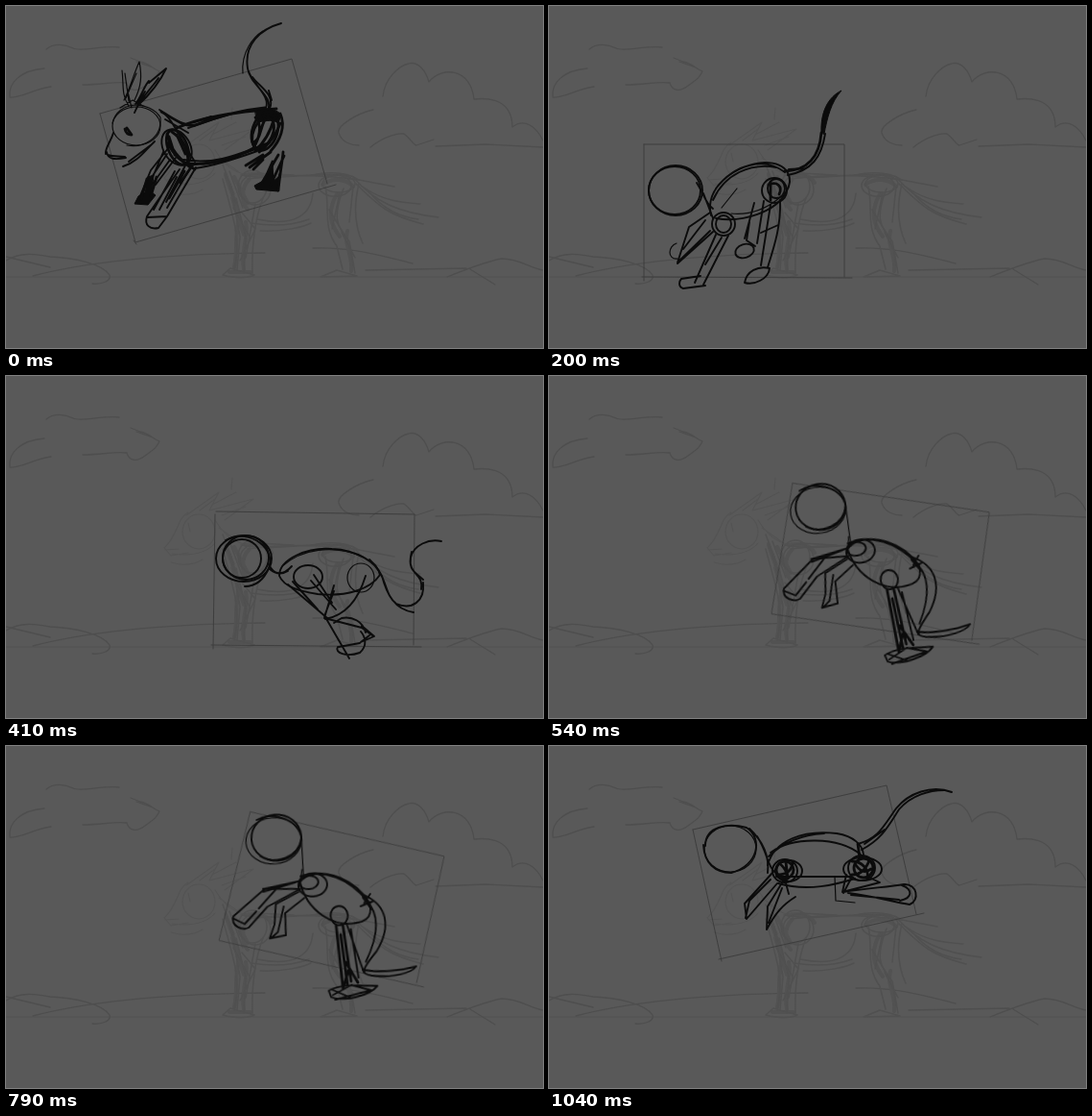
Animation, 560 px wide and 356 px high, one loop 1160 ms. Source, as an HTML page:

```html
<!DOCTYPE html>
<html lang="en">
<head>
<meta charset="utf-8">
<title>Jump cycle sketch</title>
<style>
html, body { margin: 0; width: 100%; height: 100%; overflow: hidden; background: #595959; }
svg { display: block; width: 560px; height: 356px; }
path, ellipse { fill: none; stroke-linecap: round; stroke-linejoin: round; }
.land { stroke: #4e4e4e; stroke-width: 1.3; }
.ghost { stroke: #505050; stroke-width: 1.5; }
.ghost .faint { stroke: #535353; stroke-width: 1.1; }
.ghost .shade { stroke: #525252; stroke-width: 4; }
.pose { stroke: #0b0b0b; stroke-width: 1.9; opacity: 0; animation: 1160ms step-end infinite; }
.pose .box { stroke: #3c3c3c; stroke-width: .9; }
.pose .thin { stroke-width: 1.2; }
.pose .bold { stroke-width: 2.8; }
.pose .ink { fill: #0b0b0b; stroke-width: 1; }

/* Each drawing is held, and shifted where it doubles as an in-between. */
#leap { animation-name: leap; }
#dive { animation-name: dive; }
#land { animation-name: land; transform-origin: 203px 213px; }
#tuck { animation-name: tuck; }
#push { animation-name: push; transform-origin: 372px 183px; }
#rise { animation-name: rise; }
#soar { animation-name: soar; }
@keyframes leap { 0% { opacity: 1 } 6.897%, 100% { opacity: 0 } }
@keyframes dive { 0% { opacity: 0 } 6.897% { opacity: 1 } 13.793%, 100% { opacity: 0 } }
@keyframes land {
  0% { opacity: 0 }
  13.793% { opacity: 1; transform: translate(-3px, -17px) rotate(-9deg) }
  17.241% { opacity: 1; transform: none }
  25% { opacity: 1; transform: translate(35px, 0) }
  31.897%, 100% { opacity: 0; transform: none }
}
@keyframes tuck {
  0% { opacity: 0 }
  31.897% { opacity: 1; transform: translate(-45px, 0) }
  35.345% { opacity: 1; transform: none }
  46.552%, 100% { opacity: 0; transform: none }
}
@keyframes push {
  0% { opacity: 0 }
  46.552% { opacity: 1; transform: translate(-25px, 11px) rotate(-9deg) }
  56.897% { opacity: 1; transform: none }
  68.103% { opacity: 1; transform: translate(-31px, -25px) rotate(-4.5deg) }
  78.448%, 100% { opacity: 0; transform: none }
}
@keyframes rise { 0% { opacity: 0 } 78.448% { opacity: 1 } 89.655%, 100% { opacity: 0 } }
@keyframes soar { 0% { opacity: 0 } 89.655%, 100% { opacity: 1 } }
</style>
</head>
<body>
<svg viewBox="0 0 560 356">
  <g class="land">
    <path d="M47 84C30 86 15 96 4 95C2 80 15 67 40 65M42 45C50 38 62 40 70 44S100 41 118 43"/>
    <path d="M80 82C100 82 115 78 126 80C128 88 136 90 145 83S156 76 160 68C154 66 150 60 140 58L130 54M136 58L153 64"/>
    <path d="M393 94C395 75 410 62 420 60C430 57 438 68 441 79C455 62 485 65 488 97C505 95 528 98 528 126C541 116 553 126 560 140"/>
    <path d="M383 108C365 112 345 125 347 132C350 142 360 145 368 145M380 147C395 135 410 132 415 133C422 138 425 145 428 145L446 139M448 146L500 144L560 147"/>
    <path d="M0 282H560" stroke-width=".8"/>
    <path d="M0 265C15 256 30 258 46 261C70 262 100 268 108 280C110 287 98 290 90 289M0 261L46 272M28 281C90 265 180 258 270 257"/>
    <path d="M320 252C360 250 400 262 424 268M375 275L480 273M460 282C490 270 505 265 517 263C535 263 545 272 560 275M484 274L510 290"/>
  </g>

  <g class="ghost">
    <g class="faint">
      <ellipse cx="201" cy="162" rx="17" ry="18"/>
      <path d="M190 142C178 148 180 165 165 179L172 187L190 184M166 181L180 180M172 194C185 198 195 197 205 191M173 185C195 188 210 183 218 174M190 153L192 162"/>
      <path d="M188 145L222 121L212 140L258 128L228 150M202 140L218 128M215 134L240 121M235 118L236 106M225 145L250 136"/>
      <path d="M218 150C228 166 238 174 250 175M222 158L242 172"/>
    </g>
    <g class="shade">
      <path d="M229 176C234 192 240 205 244 222M238 178L252 205M236 200L248 238M254 180C244 190 246 205 252 212"/>
      <path d="M243 222C238 238 242 256 238 272M250 225C254 240 244 256 248 274M233 277H255M330 186C340 178 355 180 362 188"/>
      <path d="M345 196C334 215 339 228 348 240M356 234C352 250 362 258 360 276M250 176C265 173 274 178 277 184"/>
    </g>
    <path d="M226 165L238 196M228 174L240 206M233 172L247 210M245 176C290 183 310 172 360 177M252 180C290 175 325 175 368 181M262 174L300 176M318 176C340 172 356 173 368 181"/>
    <ellipse cx="260" cy="191" rx="16" ry="16"/>
    <ellipse cx="257" cy="188" rx="15" ry="17"/>
    <ellipse cx="343" cy="187" rx="17" ry="11"/>
    <ellipse cx="347" cy="185" rx="17" ry="9"/>
    <path d="M262 222C300 230 318 218 320 195M265 234C290 235 310 230 318 226M256 226C280 230 300 228 316 222"/>
    <path d="M226 180C235 215 246 240 238 275M234 185L244 240L241 275M240 200L250 240L248 278M268 200C260 220 256 250 257 278M246 215L260 232L244 265M260 206L250 262M237 210L254 240M226 280L234 273L259 280C250 284 238 283 226 280"/>
    <path d="M333 188C338 210 330 230 345 250L351 274M352 190C340 220 345 230 358 245L364 278M368 185C362 210 364 230 372 247M328 282L345 275L366 281ZM337 212L354 240M362 188L358 225M348 195L340 232M350 236L364 262"/>
    <path d="M362 178C385 205 410 215 451 220M365 185C390 210 400 218 435 227M368 181L405 188M372 188C395 205 420 205 432 206M380 195C395 213 415 220 430 222"/>
  </g>

  <g class="pose" id="leap">
    <path class="box" d="M98 112L298 55L335 185M344 186L135 246L98 112M133 244L136 248"/>
    <ellipse class="thin" cx="136" cy="125" rx="25" ry="20"/>
    <path class="thin" d="M111 122C116 98 150 98 161 116C163 139 142 148 126 145"/>
    <path class="bold" d="M124 128C125 133 129 134 131 134L126 127"/>
    <path d="M112 132C109 142 103 148 104 154M105 152C106 160 114 160 125 158M106 155C112 157 117 156 124 157M122 167C138 162 145 150 155 141M128 162L152 144"/>
    <path class="thin" d="M128 104C120 92 123 82 121 67M124 70L128 99M123 98C130 84 132 74 139 58C142 73 141 84 134 98M125 96L136 70M119 106L132 98L143 104M126 85L131 106"/>
    <path d="M135 102C141 95 144 83 149 78M149 80L167 65C161 78 150 92 138 103M134 111C140 96 150 88 159 75M137 102L145 89"/>
    <path class="bold" d="M162 110C176 118 186 126 197 124C218 116 240 109 270 106M178 127C205 115 240 110 282 107"/>
    <path d="M160 108C174 116 182 140 197 162M166 118L190 132M190 127C220 117 245 106 275 108M196 121L214 115"/>
    <path class="bold" d="M188 164C210 166 235 161 258 148M192 165C220 164 245 156 270 144"/>
    <path d="M185 160C220 166 245 153 275 142M197 169C220 166 248 156 262 151"/>
    <ellipse class="bold" cx="179" cy="147" rx="10" ry="19" transform="rotate(-22 179 147)"/>
    <ellipse cx="178" cy="147" rx="14" ry="20" transform="rotate(-30 178 147)"/>
    <path class="bold" d="M168 133C172 150 180 158 192 168M173 131C186 140 190 150 190 164M169 143C176 158 184 162 197 170M178 134L187 154M170 136L176 155"/>
    <path class="ink" d="M260 110C270 105 282 107 287 113L284 122C276 116 268 122 262 120Z"/>
    <ellipse class="bold" cx="270" cy="130" rx="13" ry="21" transform="rotate(18 270 130)"/>
    <ellipse class="bold" cx="268" cy="132" rx="10" ry="17" transform="rotate(24 268 132)"/>
    <path class="bold" d="M286 112C292 125 286 140 276 151M260 116C268 124 264 138 258 148M280 116C276 130 270 142 260 150M270 118C264 130 266 138 258 142M286 122C280 138 270 148 264 152"/>
    <path d="M170 147L151 171L139 200M164 152L150 185M171 160L153 185M177 158L156 186M168 154L148 184"/>
    <path class="ink" d="M148 178L154 176L152 194L156 197L148 207L134 206L138 198L145 194Z"/>
    <path class="bold" d="M157 178L151 198M147 180L141 201"/>
    <path d="M181 170L160 200L147 219C144 228 150 233 159 231L168 219L198 168M178 178L160 212M187 166L167 204M190 172L168 210M147 220L168 219M176 172L154 212"/>
    <path class="bold" d="M186 172L170 200M195 165L182 184M250 166L268 155M254 168L276 152M258 170L268 160"/>
    <path class="ink" d="M278 166L268 182L259 187L261 191L284 193L287 168L284 178L279 182Z"/>
    <path class="bold" d="M289 152C288 164 285 178 284 192M284 155L267 184M290 156L276 186M278 162L270 180"/>
    <path d="M273 108C280 94 254 82 252 65C248 40 265 24 287 18M271 106C276 94 258 82 253 68M275 107C281 92 264 84 257 74M277 98L274 88"/>
    <path class="thin" d="M247 70C245 48 258 32 268 26"/>
  </g>

  <g class="pose" id="dive">
    <path class="box" d="M79 143L276 78L319 207M327 205L117 274M121 276L79 143"/>
    <ellipse cx="119" cy="163" rx="23" ry="21"/>
    <ellipse cx="120" cy="163" rx="22" ry="22"/>
    <path d="M142 151C148 156 154 158 160 158M142 153C152 166 150 170 163 181M145 154L158 171M156 160C162 150 172 144 182 137M158 157L171 145"/>
    <ellipse cx="207" cy="159" rx="48" ry="29" transform="rotate(-24 207 159)"/>
    <ellipse cx="206" cy="160" rx="46" ry="30" transform="rotate(-28 206 160)"/>
    <path class="bold" d="M160 164C178 142 210 125 246 126M160 176C158 160 190 136 232 128M176 192C200 193 220 182 240 166M162 161C161 174 164 184 176 190M184 146C205 132 226 125 250 130M190 192C212 188 226 176 236 167"/>
    <ellipse class="bold" cx="236" cy="149" rx="15" ry="21" transform="rotate(18 236 149)"/>
    <ellipse class="bold" cx="241" cy="148" rx="12" ry="19" transform="rotate(20 241 148)"/>
    <ellipse cx="234" cy="150" rx="11" ry="15"/>
    <path class="bold" d="M223 140C222 152 226 164 232 170M246 128C258 134 258 152 246 166M228 138C234 146 232 156 240 162M248 136C244 148 246 156 236 166M226 150C236 142 244 144 250 138"/>
    <ellipse cx="176" cy="184" rx="15" ry="12"/>
    <ellipse cx="172" cy="190" rx="14" ry="12"/>
    <ellipse cx="179" cy="187" rx="11" ry="13"/>
    <path class="bold" d="M162 180C170 172 184 174 190 180M162 186C168 196 180 198 188 190M164 176C162 186 166 192 174 194"/>
    <path class="thin" d="M152 206C162 210 176 208 184 204M156 182L146 190"/>
    <path d="M158 179L136 196M146 202L107 216M128 201L112 212M156 201L130 219L109 228M104 218C102 222 104 226 107 228M156 197L140 208"/>
    <path d="M160 208L122 255M152 220L134 238M114 262C112 266 116 270 120 269L130 267M114 262L125 257M171 200L146 244L136 265M160 208L148 234L159 232M168 208L140 250M154 222L140 248M164 206L150 228"/>
    <path d="M222 168C219 192 210 208 207 220L213 224L225 202M218 196L211 212M225 164C220 190 226 205 224 222M228 168C223 188 228 206 226 224M242 164L244 210M242 174L238 203M246 160L242 186M224 223C220 235 226 240 235 235C245 231 254 218 250 212M238 224L228 224"/>
    <path class="bold" d="M232 74C236 90 258 98 256 112M228 68C226 58 234 46 244 41"/>
    <path d="M245 123C261 103 232 96 226 76C224 61 235 43 253 38C240 48 232 57 232 73C236 90 260 99 254 127M242 117C255 106 249 98 238 92M250 112L247 126"/>
  </g>

  <g class="pose" id="land">
    <path class="box" d="M99 144H308V282M316 283L97 282M99 286V144"/>
    <ellipse cx="131" cy="192" rx="27" ry="25"/>
    <ellipse cx="132" cy="192" rx="28" ry="26"/>
    <path d="M154 184C163 198 162 204 171 211M161 195L171 221"/>
    <path d="M169 218C162 188 196 164 225 163C250 163 256 180 247 194C237 214 202 226 174 221M171 202C183 175 210 163 237 168M174 190C194 164 225 157 246 173"/>
    <path class="thin" d="M180 210L196 190M190 216C212 218 229 209 240 200"/>
    <ellipse cx="235" cy="192" rx="13" ry="13"/>
    <ellipse cx="237" cy="190" rx="9" ry="10"/>
    <path class="bold" d="M229 186C238 182 244 188 240 196M231 184L231 202"/>
    <ellipse cx="182" cy="227" rx="12" ry="12"/>
    <ellipse cx="182" cy="227" rx="8" ry="9"/>
    <path d="M168 215L146 230L134 267L168 234M163 223L140 253M171 235L134 268"/>
    <path class="thin" d="M133 247C124 250 123 264 134 263"/>
    <path d="M174 238L152 288M187 239L161 290M180 241L163 269M138 284L158 281M163 291L140 294C134 292 136 286 138 284"/>
    <path d="M214 205L204 242M224 203L217 247M209 225L206 244L215 250M241 202C242 229 235 250 228 272M231 207L221 270M221 236L239 228"/>
    <ellipse cx="204" cy="255" rx="10" ry="7" transform="rotate(-18 204 255)"/>
    <path d="M204 288C206 276 218 270 230 273C229 284 214 291 204 288"/>
    <path class="bold" d="M246 172C269 171 282 158 284 132"/>
    <path d="M249 176C274 171 284 158 288 133M250 170L268 169"/>
    <path class="ink" d="M284 132C283 110 291 95 305 88C294 100 290 117 287 133Z"/>
  </g>

  <g class="pose" id="tuck">
    <path class="box" d="M219 141L426 144L425 280M433 282L214 280M216 284L218 144"/>
    <ellipse cx="248" cy="190" rx="29" ry="24"/>
    <ellipse cx="250" cy="189" rx="24" ry="23"/>
    <ellipse cx="246" cy="190" rx="20" ry="20"/>
    <path d="M229 171C256 157 282 182 274 200C268 214 258 219 249 219"/>
    <path d="M274 196C279 207 288 209 298 198M275 201C282 207 289 206 294 203"/>
    <path d="M285 208C285 190 315 178 340 180C366 181 388 195 390 207C380 222 355 230 325 227C307 224 290 220 285 208"/>
    <path class="thin" d="M288 198C308 180 341 175 372 188"/>
    <ellipse cx="315" cy="209" rx="15" ry="12"/>
    <ellipse class="thin" cx="370" cy="210" rx="14" ry="15"/>
    <path d="M294 217L335 252M299 214L325 243M318 213L344 243M321 207L340 236M375 208C368 231 356 249 333 253M332 252L342 218M342 224L332 250"/>
    <path d="M333 251L358 294M336 253L371 262L382 270M342 257L350 252C361 250 372 255 375 267M371 260L384 271L370 277L379 270M346 282C342 288 355 293 369 288C377 281 375 272 370 266M347 282L369 278"/>
    <path d="M379 191C398 207 394 228 407 237C423 244 437 235 435 215M392 208C397 227 405 243 425 246M433 222C436 205 419 207 422 189C425 176 441 169 454 172M435 212C427 204 418 203 423 183"/>
  </g>

  <g class="pose" id="push">
    <path class="box" d="M293 87L491 149L452 278M459 283L250 218L293 87"/>
    <ellipse cx="318" cy="116" rx="26" ry="24"/>
    <ellipse class="thin" cx="315" cy="119" rx="29" ry="24"/>
    <path d="M299 96C317 87 344 100 344 119C339 139 315 144 300 134"/>
    <path class="thin" d="M344 119L343 161M342 151L339 166"/>
    <path d="M339 164C351 150 381 158 401 181C416 196 411 210 394 211C370 214 344 195 339 164M340 158C368 151 397 166 410 192"/>
    <ellipse cx="352" cy="168" rx="15" ry="12"/>
    <ellipse cx="348" cy="165" rx="10" ry="7"/>
    <ellipse cx="377" cy="202" rx="9" ry="10"/>
    <path d="M338 163L302 168L267 194C263 204 275 210 282 207L303 187L339 171M300 171L334 164M316 167L294 188M266 196L278 203L291 191M300 168L337 171"/>
    <path d="M337 174L312 185L309 206L303 220L320 218L321 195L342 181M320 188L312 214L304 220"/>
    <path class="bold" d="M373 212L375 277M380 212L384 271M377 222L380 275M380 251L391 273M382 260L375 278"/>
    <path d="M384 211L398 263M388 217L392 268M360 279C375 272 394 277 411 278C402 288 374 292 362 286ZM364 284L384 275L404 282L366 289M363 278L382 288"/>
    <path d="M405 183C427 195 431 217 413 242C396 260 394 264 406 267C426 271 447 268 453 261C432 265 410 264 397 260M406 188C421 205 415 228 401 252M404 191L411 182M403 185L411 198M400 194L413 190"/>
  </g>

  <g class="pose" id="rise">
    <path class="box" d="M218 49L424 79L405 216M412 217L195 186L218 49"/>
    <ellipse cx="246" cy="77" rx="27" ry="25"/>
    <ellipse cx="244" cy="79" rx="26" ry="25"/>
    <path d="M225 59C245 48 273 61 271 80C267 99 245 101 232 92"/>
    <path class="thin" d="M273 76L272 104L280 121"/>
    <path d="M276 121C283 101 319 96 345 105C364 111 371 123 368 136C350 150 305 149 287 138C278 132 275 128 276 121M280 109C310 97 350 104 369 128"/>
    <ellipse cx="297" cy="124" rx="12" ry="8"/>
    <ellipse cx="294" cy="125" rx="15" ry="10"/>
    <ellipse cx="349" cy="131" rx="12" ry="10"/>
    <ellipse cx="350" cy="130" rx="8" ry="8"/>
    <path d="M278 114C260 127 240 130 230 132L217 139L222 143L252 138M278 120L244 133M218 142L232 131"/>
    <path class="bold" d="M290 132L225 152M299 137L232 172L249 164M296 138L237 165M233 167L262 151"/>
    <ellipse cx="235" cy="158" rx="15" ry="11"/>
    <ellipse cx="240" cy="158" rx="17" ry="8"/>
    <path d="M224 150L238 171M229 148L222 162M243 149L231 170M225 161L251 150M237 149L249 166M282 130L249 153"/>
    <path d="M334 145L332 169M341 143C341 165 347 178 358 186L375 208M347 144L345 169L365 188M339 159L348 179M357 138L382 181L397 203M363 145L396 176L393 180L377 178M360 189C374 198 382 190 378 176M376 177L391 202"/>
    <ellipse cx="387" cy="207" rx="15" ry="9"/>
    <ellipse cx="387" cy="208" rx="13" ry="8" transform="rotate(-25 387 208)"/>
    <path d="M380 202L391 216M393 201L383 214"/>
    <path d="M358 116C381 134 403 144 430 144C455 141 468 146 477 152M365 125C384 139 405 147 435 145M369 128C388 138 412 143 441 145"/>
  </g>

  <g class="pose" id="soar">
    <path class="box" d="M150 87L352 41L383 175M391 174L177 222M180 224L150 87"/>
    <ellipse class="thin" cx="189" cy="107" rx="27" ry="24"/>
    <path d="M163 104C163 83 187 80 206 85C223 96 219 124 190 132C173 132 162 122 161 103M209 86C223 99 230 114 228 132M217 94C228 111 227 123 235 131"/>
    <path d="M228 124C235 98 265 87 300 91C318 94 327 103 328 113M231 111C254 94 302 94 325 113M229 115C247 97 271 92 287 91"/>
    <path d="M237 136H315M239 143C270 152 300 144 319 138"/>
    <ellipse cx="246" cy="130" rx="13" ry="12"/>
    <ellipse cx="250" cy="130" rx="14" ry="11"/>
    <ellipse class="bold" cx="246" cy="129" rx="9" ry="9"/>
    <path class="bold" d="M240 122C248 128 250 136 246 142M254 122C252 132 246 134 238 134M247 121L249 138"/>
    <ellipse cx="326" cy="127" rx="14" ry="13"/>
    <ellipse cx="327" cy="128" rx="20" ry="12"/>
    <ellipse class="bold" cx="328" cy="127" rx="10" ry="10"/>
    <path class="bold" d="M316 120C326 120 334 128 332 138M334 119C330 130 324 134 316 134M320 124C326 132 330 132 336 128M322 102L324 116"/>
    <path d="M233 132L204 164L206 180L238 143M231 139L209 161L205 179M245 139L228 167L227 191C236 174 244 165 257 157M246 139L250 154M243 148L229 184"/>
    <path d="M310 134L306 152L345 142L334 137M315 138L307 153M307 152C330 148 353 147 370 144C384 143 387 161 376 165C358 162 338 156 312 153M368 145C379 149 380 158 366 161M315 155L365 160"/>
    <path class="thin" d="M298 136L299 161L319 163"/>
    <path d="M322 102C344 96 349 83 362 65C375 49 399 40 420 48M326 108C348 96 354 83 365 66C378 51 397 46 412 46M329 102L350 87"/>
  </g>
</svg>
</body>
</html>
```
